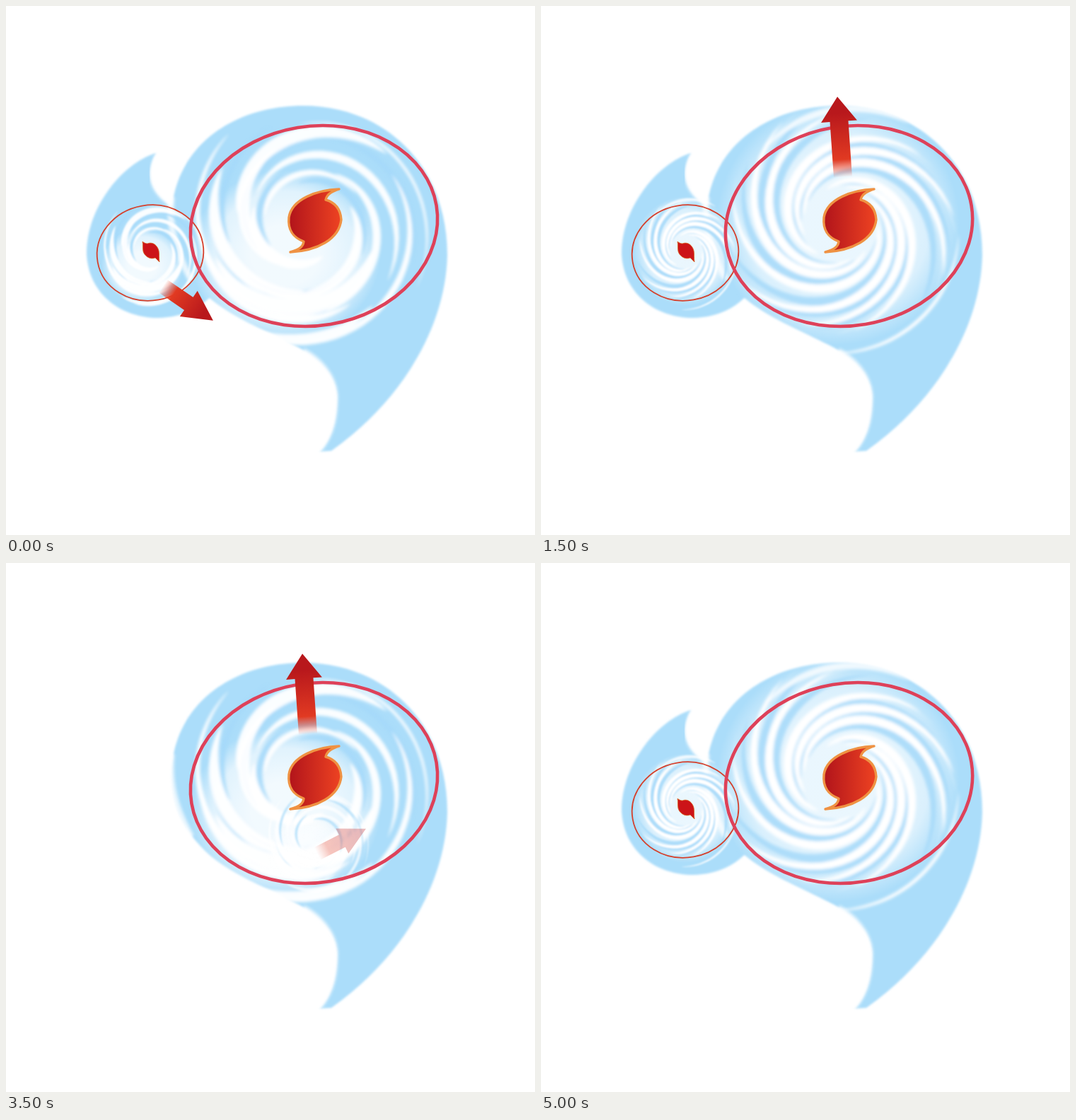
Recreate the animation shown at these times as an HTML page. Size 748x748 px, loop 5.5 s.

```html
<!DOCTYPE html>
<html lang="en">
<head>
<meta charset="utf-8">
<title>Two cyclones merging</title>
<style>
  html, body { margin: 0; width: 100%; height: 100%; overflow: hidden; background: #fff; }
  svg { display: block; width: 100vw; height: 100vh; }
</style>
</head>
<body>
<svg viewBox="0 0 748 748">
  <defs>
    <filter id="edge" x="-10%" y="-10%" width="120%" height="120%"><feGaussianBlur stdDeviation="1.8"/></filter>
    <filter id="soft" x="-30%" y="-30%" width="160%" height="160%"><feGaussianBlur stdDeviation="5"/></filter>
    <filter id="arm" x="-10%" y="-10%" width="120%" height="120%"><feGaussianBlur stdDeviation="2"/></filter>
    <linearGradient id="eyeFill">
      <stop offset="0.05" stop-color="#b4161b"/><stop offset="1" stop-color="#ee4322"/>
    </linearGradient>
    <linearGradient id="arrowFill">
      <stop offset="0" stop-color="#ea4226" stop-opacity="0"/>
      <stop offset="0.22" stop-color="#e13a22"/>
      <stop offset="0.8" stop-color="#b8181c"/>
    </linearGradient>
    <radialGradient id="glow">
      <stop offset="0.35" stop-color="#fff"/>
      <stop offset="0.75" stop-color="#fff" stop-opacity="0.75"/>
      <stop offset="1" stop-color="#fff" stop-opacity="0"/>
    </radialGradient>

    <g id="swirlA">
      <ellipse cx="-28" cy="44" rx="135" ry="120" fill="url(#glow)" opacity="0.85"/>
      <g id="armsA" filter="url(#arm)"/>
    </g>
    <g id="swirlB">
      <ellipse cx="-3" cy="-1" rx="172" ry="172" fill="url(#glow)" opacity="0.75"/>
      <g id="armsB" filter="url(#arm)"/>
    </g>
  </defs>

  <g id="smallBlob">
    <path fill="#abddfa" filter="url(#edge)" d="M212 208C165 222 113 285 114 352C118 410 165 441 215 441C250 440 275 428 296 404L292 310L250 292C220 276 190 252 212 208Z"/>
    <path fill="none" stroke="#fff" stroke-width="7" opacity="0.8" filter="url(#arm)" d="M214 212C200 240 206 262 236 282"/>
  </g>
  <g id="bigBlob">
    <path fill="#abddfa" filter="url(#edge)" d="M420 141C535 141 624 225 624 352C622 455 558 560 460 629L443 630C462 612 468 580 468 552C466 520 440 494 400 476C365 458 320 440 288 413C252 380 234 345 234 295C238 200 320 141 420 141Z"/>
    <path fill="none" stroke="#fff" stroke-width="9" opacity="0.75" filter="url(#arm)" d="M440 630C463 605 465 575 465 550C463 522 442 500 420 488M234 270C230 310 238 345 262 387"/>
  </g>
  <g id="bigSwirl"><use href="#swirlA"/><use href="#swirlB"/></g>
  <g id="smallSwirl"><use href="#swirlA"/><use href="#swirlB"/></g>
  <g id="smallMarks">
    <ellipse cx="204" cy="349" rx="75.5" ry="67.5" transform="rotate(-10 204 349)" fill="none" stroke="#d5402b" stroke-width="1.8"/>
    <path fill="#cc1418" stroke="#d9651f" stroke-width="0.8" d="M193 333C195 335 198 336 200 336C207 333 214 338 216 346C217 352 216 355 217 362C214 359 212 357 211 356C204 359 196 354 194 347C193 342 194 338 193 333Z"/>
  </g>
  <g id="bigMarks">
    <ellipse cx="435.5" cy="311" rx="175.5" ry="141" transform="rotate(-9.5 435.5 311)" fill="none" stroke="#de4159" stroke-width="4.6"/>
    <path fill="url(#eyeFill)" stroke="#ef9243" stroke-width="3.4" stroke-linejoin="round" d="M471 259C440 260 404 273 400 299C398 319 408 328 421 333C420 342 412 345 402 348C440 346 471 330 474 302C473 288 466 278 452 274C454 265 462 262 471 259Z"/>
  </g>
  <path id="upArrow" fill="url(#arrowFill)"/>
  <path id="smallArrow" fill="url(#arrowFill)"/>
</svg>
<script>
const STEP = 500, STEPS = 11;
const $ = id => document.getElementById(id);
const lerp = (a, b, u) => a + (b - a) * u;

// Tapered spiral band; angles in degrees, clockwise on screen.
function band([a0, r0, a1, r1, width], fill, opacity = 1) {
  const outer = [], inner = [], n = 28;
  for (let i = 0; i <= n; i++) {
    const u = i / n, a = lerp(a0, a1, u) * Math.PI / 180;
    const r = r0 * (r1 / r0) ** u, half = width / 2 * Math.sin(Math.PI * u) ** 0.7;
    const point = q => (q * Math.cos(a)).toFixed(1) + " " + (q * Math.sin(a)).toFixed(1);
    outer.push(point(r + half));
    inner.unshift(point(r - half));
  }
  return `<path d="M${outer.concat(inner).join("L")}Z" fill="${fill}" opacity="${opacity}"/>`;
}

const BLUE = "#a6dafa";
const whiteBands = [
  [-95, 141, 30, 182, 4], [-172, 96, -40, 152, 20], [-150, 80, 35, 142, 12],
  [-60, 82, 78, 128, 12], [-30, 141, 110, 174, 9], [-22, 68, 120, 112, 15],
  [20, 102, 160, 136, 24], [60, 130, 185, 150, 14], [90, 95, 215, 142, 20],
  [120, 134, 230, 167, 7], [110, 62, 250, 114, 17], [60, 52, 200, 76, 16],
  [190, 58, 330, 84, 9], [50, 150, 125, 172, 13]
];
const blueBands = [
  [150, 76, 275, 120, 11], [165, 110, 250, 145, 8], [35, 84, 145, 112, 6],
  [50, 118, 150, 143, 6], [120, 118, 205, 140, 4], [145, 58, 250, 78, 9],
  [-100, 58, 30, 92, 9], [-75, 125, 20, 160, 9]
];
$("armsA").innerHTML = blueBands.map(b => band(b, BLUE, 0.9)).join("") +
  whiteBands.map(b => band(b, "#fff", 0.95)).join("");

let armsB = "";
for (let i = 0; i < 9; i++) {
  const a = i * 40 + 8 * Math.sin(i * 2.3), reach = 158 + 8 * Math.sin(i * 1.7);
  armsB += band([a + 20, 55, a + 215, reach, 14], BLUE, 0.85);
  armsB += band([a, 52, a + 195, reach, 13], "#fff");
  armsB += band([a + 45, 72, a + 205, reach + 4, 3], "#fff", 0.8);
}
armsB += band([5, 168, 95, 184, 5], "#fff") + band([225, 150, 305, 172, 10], "#fff", 0.8);
$("armsB").innerHTML = armsB;

// Arrow pointing along +x with its tail at the origin.
const arrowPath = (length, shaft, head, half) =>
  `M0 ${-shaft}H${length - head}V${-half}L${length} 0L${length - head} ${half}V${shaft}H0Z`;
$("upArrow").setAttribute("d", arrowPath(114, 13, 35, 25.5));
$("upArrow").setAttribute("transform", "translate(427 242) rotate(-94)");
$("smallArrow").setAttribute("d", arrowPath(86, 11, 42, 22));

const show = (id, on, opacity = 1) => {
  $(id).setAttribute("display", on ? "inline" : "none");
  $(id).setAttribute("opacity", opacity);
};
const move = (id, transform) => $(id).setAttribute("transform", transform);

function pickSwirl(id, second) {
  const [a, b] = $(id).children;
  a.setAttribute("display", second ? "none" : "inline");
  b.setAttribute("display", second ? "inline" : "none");
}

const drift = { 5: [20, 50], 6: [78, 111], 7: [233, 42] };
const heading = { 5: [222, 396, 34.5], 6: [222, 388, 5], 7: [207, 369, -27] };

function draw(step) {
  const second = [1, 3, 5, 8, 10].includes(step);
  const grown = step === 8 || step === 9, fading = step === 7;
  const [dx, dy] = drift[step] || [0, 0];
  const [ax, ay, angle] = heading[step] || heading[5];
  const growth = "translate(-58 -39) scale(1.135 1.103)";

  move("bigBlob", grown ? growth : "");
  move("bigMarks", grown ? growth : "");
  move("bigSwirl", (step === 8 ? growth : "") + "translate(423 308)");
  pickSwirl("bigSwirl", second);

  show("smallBlob", !grown && !fading);
  show("smallMarks", !grown && !fading);
  show("smallSwirl", !grown, fading ? 0.75 : 1);
  move("smallBlob", `translate(${dx} ${dy})`);
  move("smallMarks", `translate(${dx} ${dy})`);
  move("smallSwirl", `translate(${205 + dx} ${347 + dy}) scale(0.43 0.45)`);
  pickSwirl("smallSwirl", second);

  show("upArrow", [1, 3, 5, 7].includes(step));
  show("smallArrow", [0, 2, 4, 5, 6, 7].includes(step), fading ? 0.3 : 1);
  move("smallArrow", `translate(${ax + dx} ${ay + dy}) rotate(${angle}) scale(${fading ? 0.9 : 1})`);
}

const start = performance.now();
let current = -1;
function tick() {
  const step = Math.floor((performance.now() - start) / STEP) % STEPS;
  if (step !== current) draw(current = step);
  requestAnimationFrame(tick);
}
tick();
</script>
</body>
</html>
```
